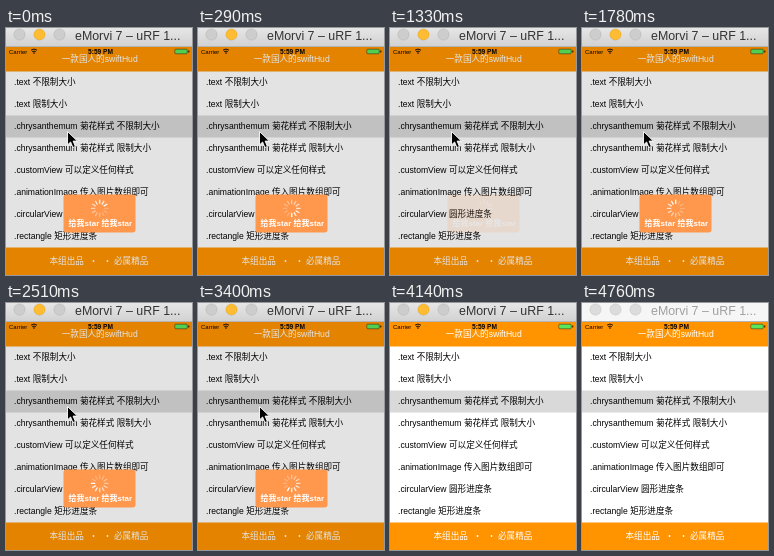
An HTML page for the animation above (4880 ms loop, 186 px wide and 247 px high).

```html
<!DOCTYPE html>
<html lang="zh">
<head>
<meta charset="utf-8">
<style>
  html, body { margin: 0; width: 100%; height: 100%; overflow: hidden; }
  svg { display: block; width: 100vw; height: 100vh; }
  text { font-family: "Liberation Sans", "Noto Sans CJK SC", "Noto Sans CJK", sans-serif; font-size: 8.6px; white-space: pre; }
  .white { fill: #fff; }
  .status { font-size: 6px; }
  .mid { text-anchor: middle; }
  .bold { font-weight: bold; }
  #bar { fill: url(#metal); }
  #title { font-size: 12.4px; fill: #333; }
  .light { fill: #cdcdcd; stroke: #000; stroke-opacity: .1; stroke-width: .7; }
  .light.amber { fill: #fdbc34; }
  .inactive #bar { fill: #f6f6f6; }
  .inactive #title { fill: #a0a0a0; }
  .inactive .light { fill: #dcdcdc; }
</style>
</head>
<body>
<svg id="stage" viewBox="0 0 186 247" preserveAspectRatio="none">
  <defs>
    <linearGradient id="metal" x2="0" y2="1">
      <stop stop-color="#e6e6e6"/>
      <stop offset="1" stop-color="#d2d2d2"/>
    </linearGradient>
  </defs>

  <rect width="186" height="247" fill="#fff"/>
  <rect y="18" width="186" height="25.5" fill="#ff9300"/>
  <rect y="87.5" width="186" height="22" fill="#d9d9d9"/>
  <rect y="219.5" width="186" height="27.5" fill="#ff9300"/>
  <g id="rows"></g>

  <text class="white mid" x="93.7" y="34">一款国人的swiftHud</text>
  <text class="white" x="43.5" y="236">本组出品</text>
  <text class="white" x="108" y="236">必属精品</text>
  <circle class="white" cx="87.5" cy="233" r=".9"/>
  <circle class="white" cx="101.5" cy="233" r=".9"/>

  <text class="status" x="3" y="25.5">Carrier</text>
  <path d="M25 22.2q3-2.4 6 0M26.2 23.7q1.8-1.4 3.6 0" fill="none" stroke="#000" stroke-width=".9"/>
  <circle cx="28" cy="25" r=".8"/>
  <text class="status mid bold" x="94.5" y="25.5" style="font-size:6.6px">5:59 PM</text>
  <rect x="168.8" y="21.2" width="12.4" height="4.6" rx="1" fill="#5ae85a" stroke="#222" stroke-width=".5"/>
  <rect x="182.3" y="22.6" width="1" height="1.8"/>

  <rect id="dim" y="19" width="186" height="228" fill="#000" opacity=".11"/>

  <g id="hud">
    <rect x="57.5" y="166.5" width="72" height="38" rx="3" fill="#ff974c"/>
    <g id="spinner" stroke="#fff" stroke-width="1.3" stroke-linecap="round"></g>
    <text class="white mid bold" x="94.4" y="198" style="font-size:8px">给我star 给我star</text>
  </g>

  <path id="cursor" d="M1 .8V14.2L4.1 11.3L6.4 16.8L8.9 15.8L6.6 10.4H10.9Z" fill="#000" stroke="#fff" stroke-width=".9"/>

  <rect id="bar" width="186" height="18"/>
  <rect y="18" width="186" height="1" fill="#b4b4b4"/>
  <circle class="light" cx="13.5" cy="6.5" r="5.7"/>
  <circle class="light amber" cx="33.5" cy="6.5" r="5.7"/>
  <circle class="light" cx="53.5" cy="6.5" r="5.7"/>
  <text id="title" x="69" y="11.5">eMorvi 7 – uRF 1...</text>
</svg>
<script>
  const LOOP = 4880, SPOKES = 12;
  const ticks = [0, 150, 290, 440, 1330, 1480, 1630, 1780, 1930, 2070, 2220, 2360, 2510,
    2660, 2810, 2960, 3100, 3250, 3400, 3550, 3840, 3990, 4140, 4760];
  const labels = [
    '.text 不限制大小', '.text 限制大小',
    '.chrysanthemum 菊花样式 不限制大小', '.chrysanthemum 菊花样式 限制大小',
    '.customView 可以定义任何样式', '.animationImage 传入图片数组即可',
    '.circularView 圆形进度条', '.rectangle 矩形进度条'
  ];
  const $ = id => document.getElementById(id);

  function add(parent, tag, attrs, text = '') {
    const el = document.createElementNS('http://www.w3.org/2000/svg', tag);
    for (const name in attrs) el.setAttribute(name, attrs[name]);
    el.textContent = text;
    return parent.appendChild(el);
  }

  labels.forEach((label, i) => add($('rows'), 'text', { x: 8, y: 57.2 + 22 * i }, label));
  const spokes = Array.from({ length: SPOKES }, (_, i) => add($('spinner'), 'path', {
    d: 'M0-5V-8.3', transform: `translate(93.7 180.4) rotate(${i * 360 / SPOKES})`
  }));

  const show = (id, visible) => $(id).setAttribute('visibility', visible ? 'visible' : 'hidden');

  function draw(t) {
    const opening = t < 440;
    const busy = opening || (t >= 1330 && t < 3550);
    show('dim', busy);
    show('hud', busy);
    $('hud').setAttribute('opacity', opening ? 1 : Math.max(0, Math.min(1, (t - 1275) / 400)));

    // One turn per second, with the brightest spoke leading clockwise.
    const head = Math.round((t + 200) / 1000 * SPOKES);
    spokes.forEach((spoke, i) => {
      const age = (head - i + SPOKES * 100) % SPOKES;
      spoke.setAttribute('stroke-opacity', Math.max(.25, 1 - age * .085));
    });

    const [x, y] = t < 3840 ? [60.5, 102.7] : t < 3990 ? [103.5, 218.8] : [111.5, 233.8];
    $('cursor').setAttribute('transform', `translate(${x} ${y})`);
    show('cursor', t < 4140);
    $('stage').classList.toggle('inactive', t >= 4760);
  }

  const start = performance.now();
  function frame() {
    const t = (performance.now() - start) % LOOP;
    draw(ticks.findLast(tick => tick <= t));
    requestAnimationFrame(frame);
  }
  frame();
</script>
</body>
</html>
```
